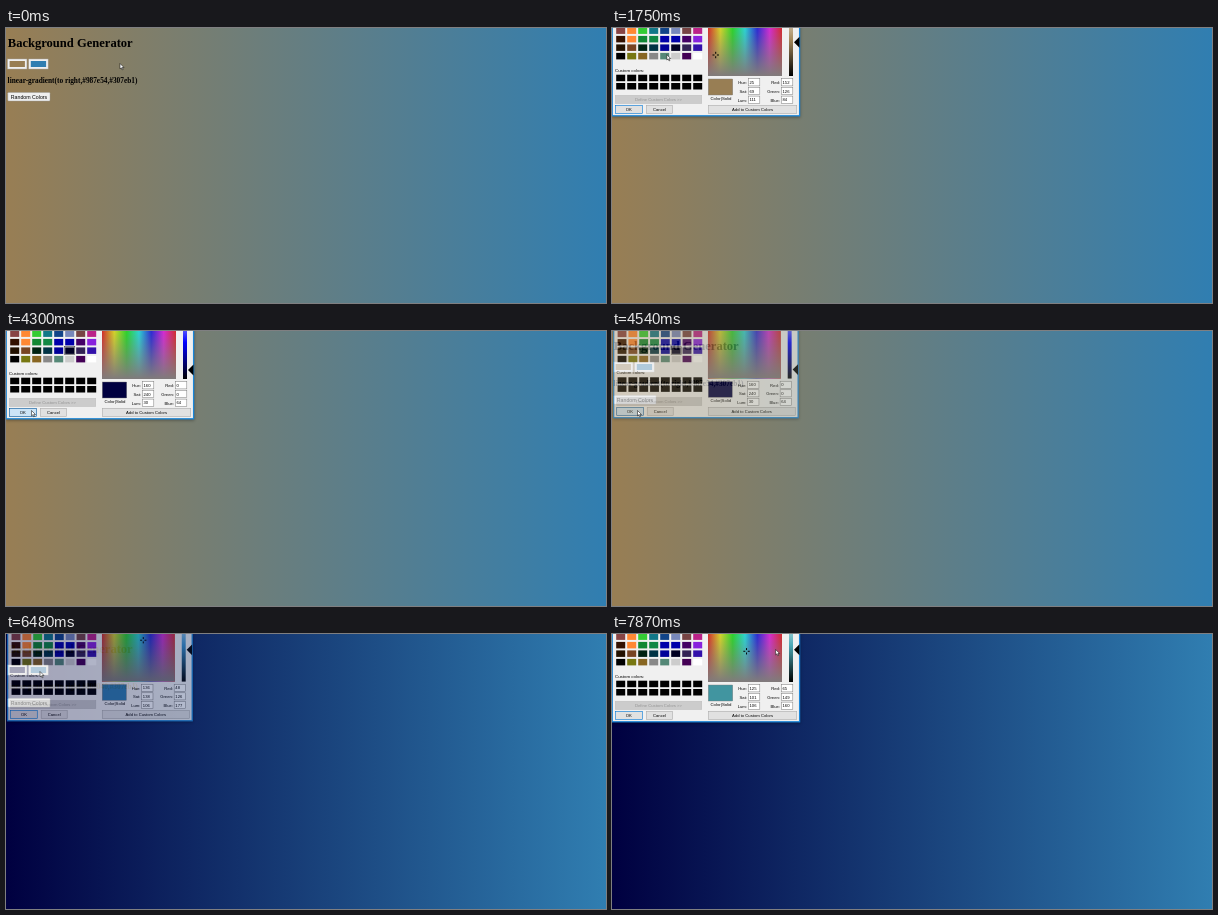
Recreate the animation shown at these times as an HTML page. Size 600 px wide and 275 px high, loop 8000 ms.

```html
<!DOCTYPE html>
<html lang="en">
<head>
<meta charset="utf-8">
<title>Background Generator</title>
<style>
  html, body { margin: 0; width: 100%; height: 100%; overflow: hidden; }
  svg { display: block; width: 600px; height: 275px; }
  text { font-family: "Liberation Sans", Arial, sans-serif; font-size: 4.2px; white-space: pre; }
  .serif { font-family: "Liberation Serif", "Times New Roman", serif; font-weight: bold; }
  .mid { text-anchor: middle; }
  .end { text-anchor: end; }
  #window { filter: drop-shadow(0 1px 1.5px rgba(0, 0, 0, .35)); }
</style>
</head>
<body>
<svg viewBox="0 0 600 275">
  <defs>
    <linearGradient id="pageFill"><stop id="stopL"/><stop offset="1" stop-color="#307eb1"/></linearGradient>
    <linearGradient id="hues"></linearGradient>
    <linearGradient id="grey" x2="0" y2="1">
      <stop stop-color="#808080" stop-opacity="0"/><stop offset="1" stop-color="#807b7b"/>
    </linearGradient>
    <linearGradient id="lumFill" x2="0" y2="1">
      <stop stop-color="#fff"/><stop id="lumMid" offset=".5"/><stop offset="1" stop-color="#000"/>
    </linearGradient>
  </defs>
  <rect width="600" height="275" fill="url(#pageFill)"/>
  <text class="serif" x="1.8" y="19" style="font-size:12.55px">Background Generator</text>
  <text class="serif" id="css" x="1.6" y="55" style="font-size:7.33px"></text>
  <g id="inputs"></g>
  <rect x="1.8" y="64.5" width="42.2" height="8.5" rx=".8" fill="#efefef" stroke="#999" stroke-width=".4"/>
  <text class="mid" x="23" y="70.6" style="font-size:5.25px">Random Colors</text>
  <g id="dialog">
    <rect id="window" x=".2" y="-45" width="187.4" height="132.8" fill="#f0f0f0" stroke="#1a86d9" stroke-width="1.3"/>
    <g id="swatches"></g>
    <rect id="focus" x="58.6" y="15.7" width="10.2" height="7.6" fill="none" stroke="#222" stroke-width=".5"/>
    <text x="3" y="43.6" style="font-size:4.4px">Custom colors:</text>
    <g id="buttons"></g>
    <rect x="96" y="-25" width="74" height="73" fill="url(#hues)"/>
    <rect x="96" y="-25" width="74" height="73" fill="url(#grey)"/>
    <path id="cross" d="M-3.2 0h2M1.2 0h2M0-3.2v2M0 1.2v2" stroke="#000"/>
    <rect x="177" y="-25" width="4" height="73" fill="url(#lumFill)"/>
    <path id="arrow" d="M182 0l5.5-5.5v11z"/>
    <rect id="preview" x="96.3" y="51" width="24.4" height="16" stroke="#777" stroke-width=".4"/>
    <text x="98.5" y="71.8" style="font-size:4.3px">Color|Solid</text>
    <g id="fields"></g>
  </g>
  <path id="cursor" d="M0 0v5.4l1.3-1.1.9 2 .9-.4-.9-1.9h1.8z" fill="#fff" stroke="#000" stroke-width=".5"/>
</svg>
<script>
const LOOP = 8000, STEP = 78;
const $ = id => document.getElementById(id);

function set(el, attrs) {
  for (const k in attrs) el.setAttribute(k, attrs[k]);
}
function add(parent, tag, attrs, label = '') {
  const el = document.createElementNS('http://www.w3.org/2000/svg', tag);
  set(el, attrs);
  el.textContent = label;
  return $(parent).appendChild(el);
}

// Colours as [r, g, b]
const TAN = [152, 126, 84], NAVY = [0, 0, 64], BLUE = [48, 126, 177], TEAL = [65, 149, 160];
const hex = c => '#' + c.map(v => v.toString(16).padStart(2, '0')).join('');

// Hue, saturation and luminance on the dialog's 0..240 scale
function hsl([r, g, b]) {
  const hi = Math.max(r, g, b), lo = Math.min(r, g, b), d = hi - lo, sum = hi + lo;
  const h = hi === r ? (g - b) / d : hi === g ? 2 + (b - r) / d : 4 + (r - g) / d;
  const s = d / (sum > 255 ? 510 - sum : sum);
  return [h * 40, s * 240, sum / 510 * 240].map(Math.round);
}

// Basic colours row by row; the two rows below them are black
const BASIC = ('844 f83 3c3 178 148 78b 744 b28 310 f83 183 184 00a 00a 406 82d ' +
  '210 742 021 034 009 002 325 31a 000 771 862 888 587 ccc 405 fff').split(' ');

for (let i = 0; i < 48; i++) {
  const row = i >> 3;
  add('swatches', 'rect', {
    x: 4.2 + (i % 8) * 11, y: row < 4 ? row * 8.5 - .6 : row * 8.3 + 13.5,
    width: 9, height: 6.5, fill: '#' + (BASIC[i] || '000')
  });
}

for (let i = 0; i <= 12; i++)
  add('hues', 'stop', { offset: i / 12, 'stop-color': `hsl(${i * 30},100%,50%)` });

function button(x, y, w, label, off) {
  const box = add('buttons', 'rect', {
    x, y, width: w, height: 8, fill: off ? '#ccc' : '#e1e1e1',
    stroke: off ? '#bfbfbf' : '#adadad', 'stroke-width': .6
  });
  add('buttons', 'text', { class: 'mid', x: x + w / 2, y: y + 5.5, fill: off ? '#939393' : '#000' }, label);
  return box;
}
button(3.3, 67.4, 86.4, 'Define Custom Colors >>', true);
const ok = button(3.3, 77.4, 27, 'OK');
button(34.3, 77.4, 26.4, 'Cancel');
button(96.3, 77.4, 88.4, 'Add to Custom Colors');

const fields = ['Hue:', 'Sat:', 'Lum:', 'Red:', 'Green:', 'Blue:'].map((label, i) => {
  const x = i < 3 ? 136.3 : 169.3, y = 50.7 + (i % 3) * 8.7;
  add('fields', 'text', { class: 'end', x: x - 1.3, y: y + 5.4 }, label);
  add('fields', 'rect', { x, y, width: 11.5, height: 7.2, fill: '#fff', stroke: '#7a7a7a', 'stroke-width': .5 });
  return add('fields', 'text', { x: x + 1.2, y: y + 5.2 });
});

const chips = [1.6, 22.8].map(x => {
  add('inputs', 'rect', { x, y: 31, width: 19.3, height: 10, fill: '#efefef', stroke: '#aaa', 'stroke-width': .4 });
  return add('inputs', 'rect', { x: x + 2, y: 33, width: 15.3, height: 6, fill: hex(BLUE) });
});

// Progress in n equal jumps, the first one at t0
function jumps(t, t0, n) {
  return Math.max(0, Math.min(1, (Math.floor((t - t0) / STEP + .1) + 1) / n));
}

// Cursor moves: start time, jumps, points passed at even intervals
const HOME = [114, 35.5];
const MOVES = [
  [130, 6, [64, 47], [17, 40]],
  [1600, 11, [50, 27], [103, 23], [84, 25], [67, 27]],
  [2460, 2, [67, 21]],
  [3450, 9, [25.5, 79.5]],
  [5010, 7, [19, 66], [34, 48], [39, 42.5], [39, 42]],
  [5780, 1, [34, 37.5]],
  [6790, 6, [134.5, 17]],
  [7720, 3, [163.6, 15.5]]
];

function cursorAt(t) {
  let at = HOME;
  for (const [t0, n, ...stops] of MOVES) {
    if (t < t0) break;
    const pts = [at, ...stops], u = jumps(t, t0, n) * stops.length;
    const i = Math.min(Math.floor(u), stops.length - 1);
    at = pts[i].map((v, k) => v + (pts[i + 1][k] - v) * (u - i));
  }
  return at;
}

function dialogAlpha(t) {
  const first = jumps(t, 1050, 5) ** .75, second = jumps(t, 6330, 5) ** .75;
  return t < 6330 ? first - jumps(t, 4540, 3) : second;
}

function draw(t) {
  const left = hex(t < 4620 ? TAN : NAVY);
  set($('stopL'), { 'stop-color': left });
  set(chips[0], { fill: left });
  $('css').textContent = `linear-gradient(to right,${left},${hex(BLUE)})`;

  const alpha = dialogAlpha(t);
  set($('dialog'), {
    opacity: alpha,
    transform: `translate(94 20) scale(${1 - .047 * (1 - alpha)}) translate(-94 -20)`
  });

  const picked = t < 3070 ? TAN : t < 5500 ? NAVY : t < 7400 ? BLUE : TEAL;
  const [h, s, l] = hsl(picked);
  [h, s, l, ...picked].forEach((v, i) => fields[i].textContent = v);
  set($('preview'), { fill: hex(picked) });
  set($('lumMid'), { 'stop-color': `hsl(${h * 1.5},${s / 2.4}%,50%)` });
  set($('arrow'), { transform: `translate(0 ${48 - l * 73 / 240})` });
  set($('cross'), {
    transform: `translate(${96 + h * 74 / 240} ${48 - s * 73 / 240})`,
    opacity: t >= 7400 && t < 7570 ? 0 : 1
  });
  set($('focus'), { opacity: picked === NAVY ? 1 : 0 });
  const down = t >= 4300 && t < 5500;
  set(ok, { fill: down ? '#cce4f7' : '#e1e1e1', stroke: down ? '#005499' : '#0078d7' });

  set($('cursor'), { transform: `translate(${cursorAt(t).join(' ')})` });
}

const start = performance.now();
function tick() {
  draw((performance.now() - start) % LOOP);
  requestAnimationFrame(tick);
}
tick();
</script>
</body>
</html>
```
